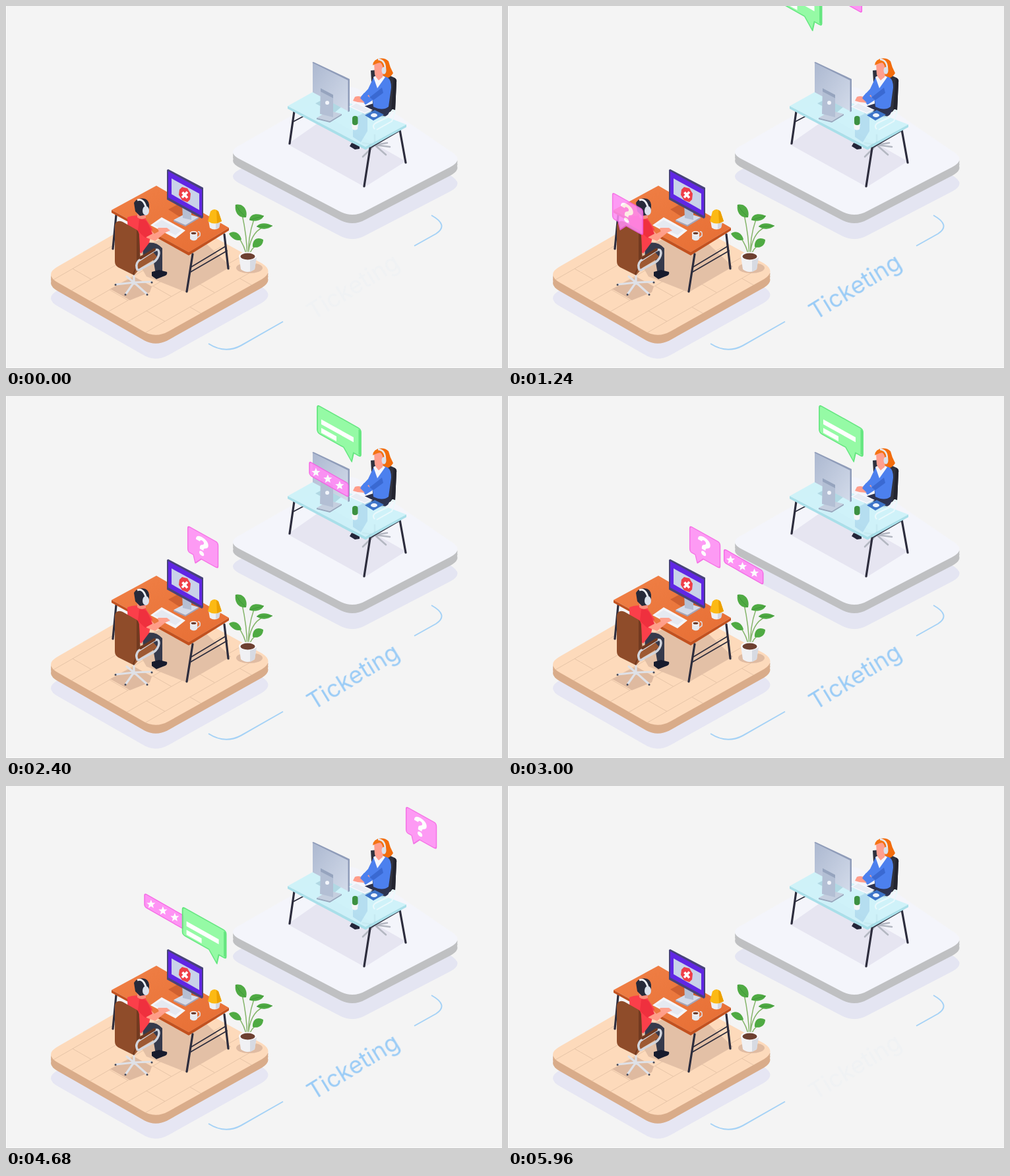
An HTML page for the animation above (6.04 s loop, 752 by 550 pixels).

```html
<!DOCTYPE html>
<html lang="en">
<head>
<meta charset="utf-8">
<title>Ticketing</title>
<style>
  html, body { margin: 0; width: 100%; height: 100%; overflow: hidden; background: #f4f4f4; }
  svg { display: block; width: 752px; height: 550px; }
  .label {
    font: 400 36px Inter, "Open Sans", sans-serif;
    fill: #9bccf6;
    animation: label 6040ms linear infinite;
  }
  @keyframes label {
    0%, 2.6% { opacity: .05; }
    11.5%, 91% { opacity: 1; }
    98.5%, 100% { opacity: .05; }
  }
  .ask { font: 800 38px Inter, "Open Sans", sans-serif; fill: #fff; text-anchor: middle; }
  .leg { fill: none; stroke: #2d2d3d; stroke-width: 3.2; stroke-linecap: round; stroke-linejoin: round; }
  .thin { stroke-width: 1.7; }
  .steel { fill: none; stroke: #b4b8c2; stroke-width: 2.6; stroke-linecap: round; stroke-linejoin: round; }
  .chrome { stroke: #dfe1e7; stroke-width: 3.2; }
  .pink { fill: #ff8cf5; stroke: #f55fe3; stroke-width: 1.5; stroke-linejoin: round; }
  .green { fill: #8dfb9f; stroke: #5ae577; stroke-width: 1.8; stroke-linejoin: round; }
</style>
</head>
<body>
<svg viewBox="0 0 752 550">
  <defs>
    <path id="floorA" d="M80 395L215 317Q234 306 253 317L388 391Q407 403 388 415L247 494Q226 506 206 493L80 421Q56 408 80 395Z"/>
    <path id="floorB" d="M357 210L500 128Q520 117 540 129L673 220Q696 233 673 245L546 311Q525 323 504 311L357 234Q331 222 357 210Z"/>
    <clipPath id="onFloor"><use href="#floorA"/></clipPath>
    <linearGradient id="back" x1="0" y1="0" x2="1" y2="1">
      <stop offset="0" stop-color="#acb8d0"/><stop offset="1" stop-color="#d3dbea"/>
    </linearGradient>
    <linearGradient id="wood" x1="0" y1="0" x2="1" y2="1">
      <stop offset="0" stop-color="#f08046"/><stop offset="1" stop-color="#e66e34"/>
    </linearGradient>
    <path id="star" d="M0-7L1.9-2.3 6.6-2.1 2.9 1 4.1 5.8 0 3.1-4.1 5.8-2.9 1-6.6-2.1-1.9-2.3Z" fill="#fff"/>
  </defs>

  <rect width="752" height="550" fill="#f4f4f4"/>
  <path d="M.5 0V550M0 549.5H752" stroke="#fcfcfc"/>

  <!-- bracket and label -->
  <path d="M307 513Q332 529 356 516L420 479.500M619 364.500L652 346Q672 333 645 318" fill="none" stroke="#a5d2f6" stroke-width="2"/>
  <text class="label" transform="translate(466 478) rotate(-31.500)">Ticketing</text>

  <!-- right platform -->
  <use href="#floorB" y="37" fill="#e4e5f2"/>
  <g fill="#bfc0c2">
    <use href="#floorB" y="4"/><use href="#floorB" y="8"/><use href="#floorB" y="13"/>
  </g>
  <use href="#floorB" fill="#f4f5fb"/>
  <path d="M427 210L487 168 606 236 544 275Z" fill="#e6e5f1"/>

  <!-- agent chair and agent -->
  <path class="steel" d="M559 196V212M559 211L541 208M559 211L578 208M559 211L541 229M559 211L576 226M559 211L582 214"/>
  <path d="M524 208L536 211 536 217 529 218 521 213Z" fill="#24263a"/>
  <path d="M553 98L563 97 589 109Q593 111 592 116L590 158 576 163 556 148Z" fill="#30323f"/>
  <path d="M588 109Q593 111 592 116L590 158 584 160Z" fill="#23242f"/>
  <path d="M535 155L560 147 582 156Q582 167 571 169L540 163Z" fill="#2d3350"/>
  <path d="M562 81Q573 77 580 84 582 93 587 102 583 109 575 110 565 108 562 100Z" fill="#f26c0c"/>
  <path d="M558 107Q571 104 579 109 584 112 584 124L580 153Q571 160 557 153L556 143 545 150 536 140 549 126Z" fill="#4c80ee"/>
  <path d="M557 143L572 132 570 124 551 139Z" fill="#3a69d2"/>
  <path d="M557 108L563 125 575 108 566 103Z" fill="#f4f6fc"/>
  <path d="M558 87Q567 81 571 91L572 100 571 108 565 113 561 108 559 104Z" fill="#ff9f8f"/>
  <path d="M556 90Q557 80 568 80 576 81 575 92 571 84 563 87Z" fill="#f47413"/>
  <path d="M564 81Q575 82 575 96" fill="none" stroke="#e6ebf5" stroke-width="2.500"/>
  <ellipse cx="573" cy="98" rx="3.500" ry="5.500" fill="#dbe1ec"/>

  <!-- glass desk -->
  <path class="leg" d="M437 160L430 209M597 188L606 238"/>
  <path class="leg thin" d="M435 176L452 167M553 215L596 190"/>
  <path d="M427 152L470 128 607 180 545 214Z" fill="#c9f3fa" fill-opacity=".85"/>
  <path d="M427 152L545 214 607 180V184L545 218.500 427 156Z" fill="#a9dfe9"/>
  <path d="M526 171L548 160 548 190 538 207 526 199Z" fill="#9ccbe8" opacity=".5"/>
  <path class="leg" d="M552 216L543 274"/>
  <path d="M469 148L486 139 510 152 497 163Z" fill="#94bfcd" opacity=".5"/>
  <path d="M471 170L490 159 509 164 491 175Z" fill="#c5cfdf"/>
  <path d="M471 170L491 175 509 164V166L491 177 471 172Z" fill="#98a5bb"/>
  <path d="M465 86L519 112V160L465 131Z" fill="url(#back)"/>
  <path d="M464 86L466 85 521 111V160L518.500 161V113Z" fill="#8f9cb9"/>
  <path d="M477 125L496 135V169L476 164Z" fill="#b3bfd4"/>
  <path d="M477 125L496 135V140L477 130Z" fill="#96a4be"/>
  <circle cx="487" cy="147" r="3" fill="#f2f5fb"/>
  <path d="M520 153L531 146 556 158 544 164Z" fill="#f7f8fd"/>
  <path d="M523 153L531 148 552 158 544 162Z" fill="#e8ecf4"/>
  <path d="M529 138Q536 135 543 140L550 135 552 140 544 147 533 146 526 144Z" fill="#ff9d8b"/>
  <path d="M543 132L555 142 546 149 537 140Z" fill="#4c80ee"/>
  <path d="M544 166L559 158 573 165 557 174Z" fill="#3d74c9"/>
  <ellipse cx="558" cy="166" rx="5" ry="3" fill="#edf2fc"/>
  <path d="M559 187Q553 181 564 176L579 169 586 158Q592 158 588 166L585 175 562 188" fill="none" stroke="#eaf9fc" stroke-width="2"/>
  <path d="M524 179H534L533 187Q529 190 525 187Z" fill="#f5f5f7"/>
  <rect x="525" y="167" width="8.500" height="14" rx="4" fill="#3c9141"/>

  <!-- left platform -->
  <use href="#floorA" y="36" fill="#e6e6f3"/>
  <g fill="#d9ac8a">
    <use href="#floorA" y="4"/><use href="#floorA" y="8"/><use href="#floorA" y="13"/>
  </g>
  <use href="#floorA" fill="#fddabb"/>
  <g id="planks" clip-path="url(#onFloor)" fill="none" stroke="#e6c4a7"/>
  <path d="M189 369L282 341 341 396 274 435 213 411Z" fill="#e3c0a6"/>
  <path d="M158 430L194 411 221 426 218 435 188 447Z" fill="#dfbaa0"/>

  <!-- left desk -->
  <path class="leg" d="M167 318L162 369M331 347L337 399"/>
  <path class="leg thin" d="M280 397L333 365M280 404L335 372M164 345L188 332"/>
  <path d="M160 310L228 273 338 337 277 374Z" fill="url(#wood)"/>
  <path d="M160 310L277 374 338 337V341L277 379 160 314Z" fill="#c2511f"/>
  <path class="leg" d="M283 377L274 434"/>
  <path d="M246 309L263 300 293 319 278 330Z" fill="#cf6030"/>
  <path d="M254 325L273 315 292 321 272 333Z" fill="#d5dbe9"/>
  <path d="M254 325L272 333 292 321V323L272 335 254 327Z" fill="#9ca6c1"/>
  <path d="M267 299L281 307V325L268 322Z" fill="#b5bfd3"/>
  <path d="M244 249L246 248 299 276V321L297 323 244 294Z" fill="#47427a"/>
  <path d="M246 251L297 279V319L246 291Z" fill="#6026e4"/>
  <path d="M251 262L293 285V310L251 286Z" fill="#c9d2e9"/>
  <path d="M267 275L275 277 280 285 279 294 275 298 267 295 262 287 263 279Z" fill="#ef3e48"/>
  <path d="M267.500 283L275 291.500M275 282.500L267 291" stroke="#fff" stroke-width="3.600"/>
  <path d="M219 333L236 321 272 341 257 353Z" fill="#f4f5fa"/>
  <path d="M224 333L236 325 266 341 257 348Z" fill="#e6e9f1"/>
  <path d="M291 343Q295 342 294 349L290 352" fill="none" stroke="#d9dce6" stroke-width="1.600"/>
  <path d="M279 345V354Q285 359 290 354V345Z" fill="#e6e8ee"/>
  <ellipse cx="284.500" cy="345" rx="5.800" ry="3" fill="#fafafc"/>
  <ellipse cx="284.500" cy="345.300" rx="4" ry="1.800" fill="#6d3e2f"/>
  <path d="M307 326L309 337Q316 342 323 337L325 326Z" fill="#eef0f4"/>
  <path d="M318 329H325L323 337 318 339Z" fill="#d2d7e2"/>
  <path d="M310 312Q316 306 322 312L327 327Q316 334 306 327Z" fill="#fcb914"/>
  <path d="M319 310L322 312 327 327 320 330Z" fill="#eba000"/>

  <!-- plant -->
  <ellipse cx="369" cy="398" rx="20" ry="8" fill="#dfbba2"/>
  <g fill="none" stroke="#85b56b" stroke-width="1.500">
    <path d="M366 382Q365 348 358 317M365 381Q362 364 352 351M368 381Q366 353 376 324M367 381Q369 345 390 336M368 381Q371 368 381 363"/>
  </g>
  <g fill="#4faa43">
    <path d="M348 302C361 299 367 312 364 321C353 323 346 313 348 302ZM338 346C344 340 355 344 357 355C349 358 342 353 338 346ZM369 325C370 314 384 315 391 319C387 327 376 328 369 325ZM380 335C386 328 397 330 404 334C397 340 387 340 380 335ZM374 366C373 354 382 350 390 355C390 364 382 369 374 366Z"/>
  </g>
  <path d="M348 302Q354 313 364 321M369 325L391 319M380 335L404 334" fill="none" stroke="#3b8f38" stroke-width=".8"/>
  <path d="M353 380L356 400Q366 408 377 400L380 380Z" fill="#f0f1f4"/>
  <path d="M370 382H380L377 400 370 404Z" fill="#d7dae2"/>
  <ellipse cx="366.500" cy="380" rx="13.500" ry="6.500" fill="#f9f9fb"/>
  <ellipse cx="366.500" cy="380.500" rx="11" ry="5" fill="#6d4031"/>

  <!-- customer and chair -->
  <path d="M207 362Q225 355 237 368L237 405 227 407 222 378 208 386Z" fill="#363a4c"/>
  <path d="M221 404L232 401 244 404Q246 409 238 411L228 415 221 410Z" fill="#171b2d"/>
  <path d="M184 321Q198 315 211 322L222 339 217 360 205 376 185 362Z" fill="#fb3f4a"/>
  <path d="M211 332L225 346 238 339 242 344 226 357 213 352Z" fill="#ff9d88"/>
  <path d="M202 324Q212 322 216 332L222 346 211 352 200 342Z" fill="#ef303e"/>
  <path d="M230 337L244 337 249 341 240 345 232 344Z" fill="#ffa18d"/>
  <path d="M199 312H212V322Q205 326 199 321Z" fill="#f98d7c"/>
  <path d="M194 299Q199 290 211 293 218 296 217 307L214 317 203 319 196 312Z" fill="#272a3a"/>
  <path d="M199 295Q209 291 213 309" fill="none" stroke="#eef0f6" stroke-width="3"/>
  <ellipse cx="212" cy="311" rx="5" ry="7" fill="#dce2ec"/>
  <path class="steel chrome" d="M194 403V422M194 420L167 423M194 420L182 437M194 420L213 437M194 420L220 419M194 420L183 411"/>
  <path d="M166 423.500h.1M181 438.500h.1M214 438.500h.1M221 420h.1" stroke="#4a4d5c" stroke-width="3" stroke-linecap="round"/>
  <path d="M165 333Q167 324 177 328L198 340Q202 343 202 350L204 397 194 409 170 397Q165 394 165 388Z" fill="#8f4c2a"/>
  <path d="M198 340Q202 343 202 350L204 397 194 409 192 407 198 393Z" fill="#723a20"/>
  <path d="M194 409L205 397 230 382 222 373 203 380Z" fill="#9d5933"/>
  <path d="M200 402Q195 394 201 387L224 372Q232 367 232 376 231 384 224 389L200 402" fill="none" stroke="#d2d5dd" stroke-width="3.400"/>
  <path d="M204 383L225 370" stroke="#6e3921" stroke-width="4" stroke-linecap="round"/>

  <!-- travelling bubbles -->
  <g id="stars" opacity=".92">
    <g transform="matrix(1 .57 0 1 0 0)"><rect class="pink" x=".7" width="59" height="20.500" rx="3"/></g>
    <use href="#star" x="10.500" y="17"/><use href="#star" x="28.500" y="27"/><use href="#star" x="46.500" y="37"/>
  </g>
  <g id="reply" opacity=".92">
    <g transform="matrix(1 .56 0 1 0 -3)">
      <path class="green" d="M5 1H63Q67 1 67 5V39Q67 43 63 43H56L53 58 41 43H5Q1 43 1 39V5Q1 1 5 1Z"/>
      <path d="M65 3V41" stroke="#5ae577" stroke-width="3"/>
      <path d="M7 19.500H56V27H7ZM7 32.500H30V40H7Z" fill="#fff"/>
    </g>
  </g>
  <g id="question" opacity=".86">
    <g transform="matrix(1 .56 0 1 0 0)">
      <path class="pink" d="M4 0H43Q46.500 0 46.500 4V35Q46.500 39 43 39H21L12 50 9 39H4Q.7 39 .7 35V4Q.7 0 4 0Z"/>
      <text class="ask" x="22.500" y="33">?</text>
    </g>
  </g>
</svg>
<script>
  const LOOP = 6040, STEP = 40;
  const NS = "http://www.w3.org/2000/svg";
  const byId = id => document.getElementById(id);
  const makePath = d => {
    const path = document.createElementNS(NS, "path");
    path.setAttribute("d", d);
    return path;
  };

  // Floor boards: long seams with joints on every row.
  let seams = "";
  for (let i = 0; i < 6; i++) {
    const x = 70 + i * 28, y = 417 + i * 16;
    seams += `M${x} ${y}l172 -99`;
    for (const k of [.18, .62]) {
      const s = k + (i % 2) * .22;
      seams += `M${x + 172 * s} ${y - 99 * s}l28 16`;
    }
  }
  byId("planks").append(makePath(seams));

  // Each leg: start ms, end ms, path of the bubble's top left corner.
  const routes = {
    question: [
      [0, 2000, "M-92 452C62 414 150 260 275 197"],
      [3440, 4340, "M275 197C330 160 390 113 447 83Q520 48 606 31"],
      [5080, 5980, "M606 31Q598 -30 570 -110"]
    ],
    reply: [
      [0, 2000, "M278 -178L471 15"],
      [3580, 4300, "M471 15C448 48 429 75 407 112Q365 184 341 231"],
      [4300, 4900, "M341 231L234 165"],
      [4960, 5900, "M234 165Q210 80 165 -100"]
    ],
    stars: [
      [505, 1505, "M146 -312L546 12"],
      [1970, 2970, "M546 12L327 232"],
      [3165, 3765, "M327 232L267 195"],
      [4366, 4770, "M267 195L201 158"],
      [4780, 5760, "M201 158Q206 80 122 -80"]
    ]
  };

  const movers = Object.entries(routes).map(([id, legs]) => ({
    node: byId(id),
    legs: legs.map(([from, to, d]) => {
      const path = makePath(d);
      return { from, to, path, length: path.getTotalLength() };
    })
  }));

  const ease = u => u * u * (3 - 2 * u);

  function place({ node, legs }, time) {
    const leg = legs.findLast(l => time >= l.from) || legs[0];
    const u = Math.min(1, Math.max(0, (time - leg.from) / (leg.to - leg.from)));
    const { x, y } = leg.path.getPointAtLength(ease(u) * leg.length);
    node.setAttribute("transform", `translate(${x.toFixed(2)} ${y.toFixed(2)})`);
  }

  function draw() {
    const time = Math.floor((performance.now() % LOOP) / STEP) * STEP;
    movers.forEach(m => place(m, time));
    requestAnimationFrame(draw);
  }
  draw();
</script>
</body>
</html>
```
